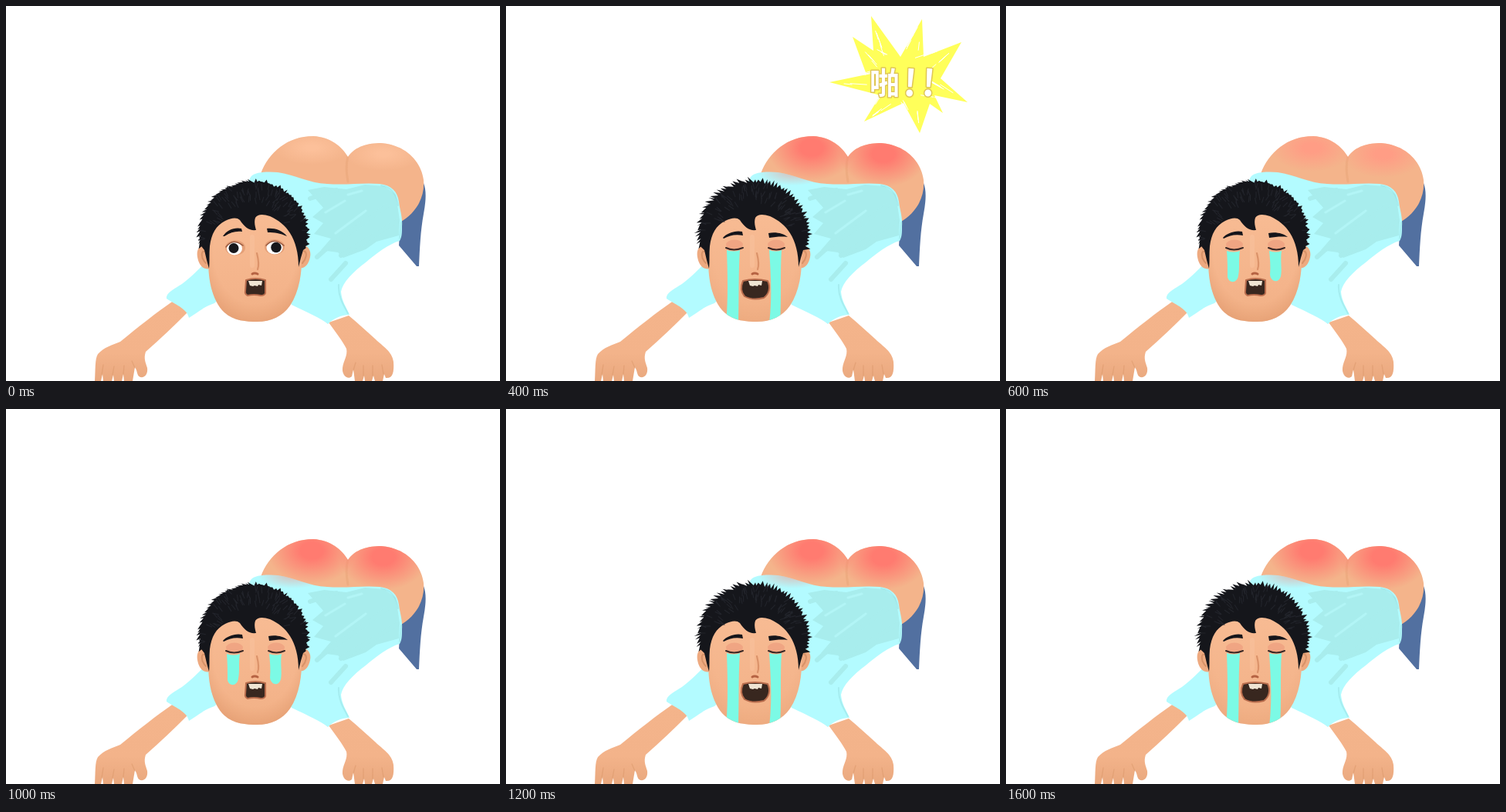
An HTML page that plays this animation: 640x487 px, repeating every 1.8 s.

```html
<!DOCTYPE html>
<html lang="zh">
<head>
<meta charset="utf-8">
<style>
html, body { margin: 0; width: 100%; height: 100%; overflow: hidden; background: #fff; }
svg { display: block; width: 640px; height: 487px; }
text { font: 900 39px "Noto Sans CJK SC", "Noto Sans CJK JP", "Noto Sans CJK", sans-serif; }
.bang { font-size: 47px; }
</style>
</head>
<body>
<svg viewBox="0 0 640 487" fill="none" stroke-linecap="round" stroke-linejoin="round">
  <defs>
    <path id="seat" d="M330 218C340 190 365 169 398 169C420 170 436 183 443 196C452 182 470 178 486 178C516 180 538 201 541 226C543 250 530 270 510 281L480 245L400 240Z"/>
    <path id="facePath" d="M263 322C260 352 267 383 283 398C295 409 312 410 325 410C344 410 358 403 368 389C380 371 384 346 383 320L376 284L340 258L290 260L265 288Z"/>
    <path id="shirtPath" d="M317 222C322 215 340 215 352 216C374 219 392 230 416 231C442 233 462 229 484 231C500 233 507 241 509 254C510 264 514 274 513 286C513 294 513 300 510 305C496 309 480 321 466 333C450 345 436 359 434 371C435 384 441 391 445 401C434 401 424 406 417 413C407 405 393 399 370 388L330 330L270 386C255 391 247 399 237 405C235 394 222 389 208 380C207 371 221 367 233 357C242 350 249 342 258 334Z"/>
    <clipPath id="seatClip"><use href="#seat"/></clipPath>
    <clipPath id="faceClip"><use href="#facePath"/></clipPath>
    <clipPath id="shirtClip"><use href="#shirtPath"/></clipPath>
    <linearGradient id="skin" x1="0" y1="0" x2="0" y2="1">
      <stop offset="0" stop-color="#f8bc94"/><stop offset=".7" stop-color="#f4b48b"/><stop offset="1" stop-color="#f1b085"/>
    </linearGradient>
    <linearGradient id="limb" gradientUnits="userSpaceOnUse" x1="0" y1="383" x2="0" y2="487">
      <stop offset="0" stop-color="#f4b48b"/><stop offset=".65" stop-color="#f3b38a"/><stop offset="1" stop-color="#e9a87e"/>
    </linearGradient>
    <radialGradient id="rim" cx=".5" cy=".4" r=".62">
      <stop offset=".72" stop-color="#e29a6e" stop-opacity="0"/><stop offset="1" stop-color="#dd9468" stop-opacity=".6"/>
    </radialGradient>
    <radialGradient id="glow"><stop offset=".15" stop-color="#fcc09a"/><stop offset="1" stop-color="#fcc09a" stop-opacity="0"/></radialGradient>
    <radialGradient id="pink"><stop offset=".2" stop-color="#ff9d85"/><stop offset="1" stop-color="#ff9d85" stop-opacity="0"/></radialGradient>
    <radialGradient id="red"><stop offset=".25" stop-color="#ff7b70"/><stop offset="1" stop-color="#ff7b70" stop-opacity="0"/></radialGradient>
  </defs>

  <path fill="#5270a0" d="M541 230C545 240 544 254 541 270C537 292 536 315 535 338L532 338L509 311L511 280C528 269 537 251 541 230Z"/>
  <use href="#seat" fill="#f4b48b"/>
  <g clip-path="url(#seatClip)">
    <path stroke="#dd976c" stroke-width="3" opacity=".3" d="M443 195C440 207 441 216 443 228"/>
    <g id="cheeks"><ellipse cx="396" cy="184"/><ellipse cx="489" cy="192"/></g>
  </g>

  <g fill="url(#limb)">
    <path d="M218 382C195 398 171 417 148 436C138 440 127 443 119 452C115 458 116 473 115 487L123 487L125 478L126 487L137 487L139 479L140 487L150 487L152 478L153 487L164 487L167 469C171 475 169 480 174 482C180 483 184 478 183 470C181 463 178 458 181 449C199 433 218 415 235 398Z"/>
    <path d="M418 411C428 425 436 435 441 445C443 454 437 461 436 470C435 480 443 486 448 481L450 472L452 487L462 487L464 480L465 487L474 487L476 480L478 487L488 487L490 478L492 483C501 484 503 476 502 462C500 448 488 442 479 433C467 422 456 412 444 402Z"/>
  </g>
  <path stroke="#d99569" stroke-width="1.3" opacity=".5" d="M124 479L126 466M138 479L140 468M152 478L153 467M167 470L163 461M450 473L453 463M463 480L463 467M475 480L475 467M489 478L487 466"/>

  <use href="#shirtPath" fill="#b3fbff"/>
  <g clip-path="url(#shirtClip)">
    <path fill="#a8eded" d="M391 239L412 235L441 238L465 232L490 234L505 245L510 278L509 298L480 306L466 316L437 327L430 320L408 317L421 302L399 296L411 282L397 274L411 262Z"/>
    <path stroke="#a8eded" stroke-width="6" d="M394 250L428 239M413 317L493 260M434 324L506 280M403 326L424 307M421 355L440 334"/>
    <path stroke="#b2f5f6" stroke-width="3" d="M414 268L439 253M427 295L466 266M443 245L461 240"/>
    <path stroke="#98dfe2" stroke-width="2" opacity=".5" d="M431 362C430 378 438 390 443 399M512 281L510 302M486 233C500 235 506 246 508 259"/>
    <ellipse id="spill" cx="372" cy="216" rx="46" ry="17" fill="url(#red)" opacity=".35"/>
  </g>

  <g fill="#eeaa80">
    <path d="M263 311C253 306 246 315 248 326C250 338 257 343 264 341Z"/>
    <path d="M382 312C390 309 396 317 394 326C392 336 387 341 381 340Z"/>
  </g>
  <path stroke="#c98259" stroke-width="2" opacity=".6" d="M259 319C252 316 252 327 259 334M386 318C391 320 389 328 384 334"/>
  <use href="#facePath" fill="url(#skin)"/>
  <use id="faceRim" href="#facePath" fill="url(#rim)"/>
  <path stroke="#fac5a2" stroke-width="6" opacity=".4" d="M319 300L319 337"/>
  <path stroke="#cc8058" stroke-width="2.2" opacity=".65" d="M325 321C327 329 328 337 326 342"/>
  <path stroke="#b66343" stroke-width="3" d="M319 348Q322 346 326 348"/>

  <g id="hairs"></g>

  <g id="openEyes">
    <ellipse cx="297" cy="314" rx="13" ry="10" fill="#e5a078"/>
    <ellipse cx="348" cy="313" rx="13" ry="10" fill="#e5a078"/>
    <ellipse cx="296" cy="315" rx="10" ry="8.5" fill="#fff"/>
    <ellipse cx="348" cy="314" rx="10.5" ry="8.5" fill="#fff"/>
    <circle cx="295" cy="314.5" r="6.5" fill="#17171b"/>
    <circle cx="350" cy="313.5" r="6.8" fill="#17171b"/>
    <path stroke="#985a40" stroke-width="1.5" d="M285 313Q294 301 307 311M337 311Q347 300 360 311"/>
    <path fill="#15151a" d="M281 299C286 291 296 287 305 289L306 293C297 292 291 294 283 299ZM338 289C347 288 358 291 364 299C355 295 348 294 339 294Z"/>
  </g>
  <g id="shutEyes">
    <ellipse cx="296" cy="310" rx="11" ry="6.5" fill="#f0a583"/>
    <ellipse cx="350" cy="310" rx="11" ry="6.5" fill="#f0a583"/>
    <path id="tears" fill="#7cfae5" clip-path="url(#faceClip)"/>
    <path stroke="#3b2825" stroke-width="2" d="M285 314Q295 319 307 314M340 314Q350 319 361 314"/>
    <path fill="#15151a" d="M281 301C286 295 297 291 306 293L307 298C297 296 290 298 282 302ZM340 295C349 293 359 295 365 300C356 299 349 300 341 301Z"/>
  </g>

  <path id="mouth" fill="#38271f" stroke="#b96d4d" stroke-width="2"/>
  <path fill="#efe4d2" d="M314 357L332 357L331 363L327 362L326 364L322 363L320 364L316 363Z"/>

  <g id="burst">
    <path fill="#ffff5a" d="M473 13L511 66L539 17L541 66L590 47L563 94L598 125L555 116L566 139L549 127L536 165L515 126L464 150L485 116L419 99L467 89L449 40L476 58Z"/>
    <g id="scratches" stroke="#fff" stroke-width="1"></g>
    <g fill="#fff" stroke="#dfc655" stroke-width="3" paint-order="stroke">
      <text x="471" y="114">啪</text>
      <text class="bang" x="515" y="117" transform="rotate(4 525 100)">!</text>
      <text class="bang" x="539" y="117" transform="rotate(4 549 100)">!</text>
    </g>
  </g>
</svg>
<script>
const el = id => document.getElementById(id);
const show = (node, on) => node.style.display = on ? "" : "none";

function randomizer(seed) {
  return () => (seed = seed * 16807 % 2147483647) / 2147483647;
}

function addNode(parent, name, attrs) {
  const node = document.createElementNS("http://www.w3.org/2000/svg", name);
  for (const k in attrs) node.setAttribute(k, attrs[k]);
  parent.append(node);
  return node;
}

// Spiky crown around the skull, closed by the hairline and forelock.
function makeHair(seed, grow) {
  const rnd = randomizer(seed);
  const g = addNode(el("hairs"), "g", {});
  const at = (a, r) => {
    const x = 320.5 + Math.cos(a) * 74 * r, y = 297 + Math.sin(a) * 73 * r;
    return x.toFixed(1) + " " + y.toFixed(1);
  };
  const from = 2.93, to = 6.5, n = 54;
  let d = "M263 341L260 330L257 317";
  for (let i = 0; i <= n; i++) {
    const a = from + (to - from) * i / n + (rnd() - .5) * .03;
    const lean = (a < 4.7 ? -1 : 1) * .03;
    d += "L" + at(a, .92 + rnd() * .035) + "L" + at(a + lean, .95 + rnd() * .06 + grow);
  }
  d += "L385 317L382 327L379 339C379 321 375 306 368 295C362 285 353 278 342 273C333 270 326 270 323 275C321 281 323 287 324 291C315 292 309 287 303 278C299 274 292 275 284 279C272 285 266 296 264 312C263 322 264 332 263 341Z";
  addNode(g, "path", { d, fill: "#15161b" });
  let lines = "";
  for (let i = 0; i < 90; i++) {
    const a = 3 + rnd() * 3.4, r = .55 + rnd() * .32;
    if (Math.sin(a) > -.25 && r < .84) continue;
    lines += "M" + at(a, r) + "L" + at(a + (rnd() - .5) * .1, r + .1);
  }
  addNode(g, "path", { d: lines, stroke: "#22242b", "stroke-width": 1.1 });
  return g;
}

const calmHair = makeHair(71, 0), wildHair = makeHair(523, .03);

function scratchStar() {
  const rnd = randomizer(39);
  const tips = [[473, 14], [539, 17], [590, 47], [598, 125], [536, 165], [465, 150], [420, 99], [449, 41]];
  let d = "";
  for (const [x, y] of tips) {
    const dx = 515 - x, dy = 93 - y, len = Math.hypot(dx, dy);
    for (let i = 0; i < 6; i++) {
      const s = .15 + rnd() * .35, e = s + .08 + rnd() * .15, side = (rnd() < .5 ? -1 : 1) * (12 + rnd() * 8);
      const point = t => (x + dx * t - dy / len * side * t).toFixed(1) + " " + (y + dy * t + dx / len * side * t).toFixed(1);
      d += "M" + point(s) + "L" + point(e);
    }
  }
  addNode(el("scratches"), "path", { d });
}
scratchStar();

const shortTears = "M286 318Q295 321 303 318C301 330 303 340 301 350C300 360 289 361 287 352C287 340 287 330 286 318ZM341 318Q350 321 357 318C355 330 358 342 356 351C353 361 343 358 342 349C343 338 342 328 341 318Z";
const longTears = "M286 317Q295 320 303 317C301 345 302 380 301 412L285 412C288 380 287 345 286 317ZM341 317Q350 320 357 317C355 345 357 380 355 412L341 412C345 380 343 345 341 317Z";
const smallMouth = "M311 356Q323 352 336 356L336 373Q335 376 330 376Q321 374 313 376Q309 374 310 370Z";
const wideMouth = "M307 357Q322 353 339 357C343 365 341 374 334 379C326 381 316 381 309 377C304 371 304 364 307 357Z";

function tintCheeks(tone, rx, ry) {
  for (const c of el("cheeks").children) {
    c.setAttribute("fill", `url(#${tone})`);
    c.setAttribute("rx", rx);
    c.setAttribute("ry", ry);
  }
  show(el("spill"), tone === "red");
}

function draw(ms) {
  const step = Math.floor(ms % 1800 / 200);
  const crying = step > 0, wail = crying && step % 2 === 0;
  show(calmHair, !wail);
  show(wildHair, wail);
  show(el("openEyes"), !crying);
  show(el("shutEyes"), crying);
  show(el("burst"), step === 1 || step === 2);
  el("faceRim").setAttribute("opacity", wail ? .35 : .9);
  el("tears").setAttribute("d", wail ? longTears : shortTears);
  el("mouth").setAttribute("d", wail ? wideMouth : smallMouth);
  // The redness flares, eases once, then stays.
  if (!crying) tintCheeks("glow", 50, 22);
  else if (step === 1 || step === 3) tintCheeks("pink", 54, 31);
  else tintCheeks("red", 58, 43);
}

const start = performance.now();
function tick() {
  draw(performance.now() - start);
  requestAnimationFrame(tick);
}
tick();
</script>
</body>
</html>
```
